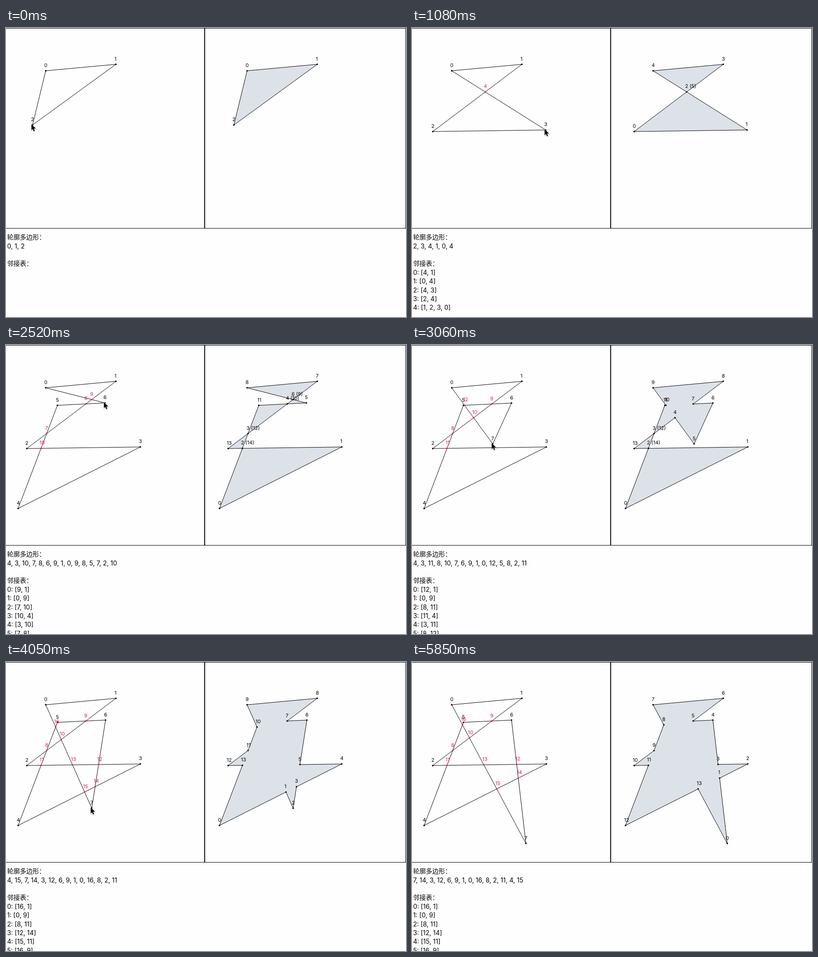
Write an HTML page that moves like this. It is 879 px wide and 637 px high and loops after 6.92 s.

```html
<!DOCTYPE html>
<html lang="zh">
<head>
<meta charset="utf-8">
<title>轮廓多边形</title>
<style>
  html, body { margin: 0; width: 100%; height: 100%; overflow: hidden; background: #fefefe; }
  svg { display: block; width: 879px; height: 637px; }
  text { font-family: Inter, "Noto Sans CJK SC", "Noto Sans CJK", sans-serif; font-size: 11px; }
  .line { font-size: 14px; }
  .edge { stroke: #000; stroke-width: 1; fill: none; }
  .area { fill: #dde1e8; }
  .cross { fill: #f0144f; }
</style>
</head>
<body>
<svg viewBox="0 0 879 637">
  <g id="scene"></g>
  <path d="M0 .5H879M0 441.5H879M878.5 0V442" stroke="#000"/>
  <path d="M436.5 0V442" stroke="#000" stroke-width="2"/>
  <g id="cursor">
    <path d="M0 0V13.2L3 10.4 5.1 15.4 7.4 14.4 5.3 9.6H9.6Z" transform="translate(.4 1.4)"
      fill="#000" stroke="#000" stroke-width="2" opacity=".14"/>
    <path d="M0 0V13.2L3 10.4 5.1 15.4 7.4 14.4 5.3 9.6H9.6Z"
      fill="#000" stroke="#fff" stroke-width="1" paint-order="stroke"/>
  </g>
</svg>
<script>
const LOOP = 6920, STEP = 90, SHIFT = 442.5;

// One track per corner: [time, x, y]; a corner exists from its first key on.
const tracks = [
  [[0, 87.3, 94.3]],
  [[0, 241.5, 80]],
  [[0, 58.3, 213.8], [450, 45.7, 228.2]],
  [[630, 56, 228], [1080, 293.8, 224.8], [1170, 294.8, 224.8], [1260, 295.3, 224.8]],
  [[1350, 285, 232], [1620, 26.7, 360.2]],
  [[1710, 27.5, 356], [2250, 113, 133]],
  [[2340, 120, 132], [2520, 217.5, 127.7], [2610, 218.7, 128]],
  [[2790, 216, 133], [3060, 177.5, 218], [4050, 188.5, 322.3],
   [5670, 188.5, 322.3], [5760, 228, 373], [5850, 250.3, 400]]
];

const scene = document.getElementById('scene');
const cursor = document.getElementById('cursor');

function place(track, t) {
  const next = track.findIndex(key => key[0] > t);
  if (next < 0) return track[track.length - 1].slice(1);
  const [t0, x0, y0] = track[next - 1], [t1, x1, y1] = track[next];
  const p = (t - t0) / (t1 - t0);
  const k = t1 - t0 > 600 ? p : (1 - Math.cos(Math.PI * p)) / 2;
  return [x0 + (x1 - x0) * k, y0 + (y1 - y0) * k];
}

function crossing([ax, ay], [bx, by], [cx, cy], [dx, dy]) {
  const rx = bx - ax, ry = by - ay, sx = dx - cx, sy = dy - cy;
  const det = rx * sy - ry * sx;
  if (!det) return null;
  const u = ((cx - ax) * sy - (cy - ay) * sx) / det;
  const v = ((cx - ax) * ry - (cy - ay) * rx) / det;
  return u > 0 && u < 1 && v > 0 && v < 1 ? { u, v, at: [ax + rx * u, ay + ry * u] } : null;
}

// Splits the edges at their crossings and links neighbouring nodes.
function buildGraph(corners) {
  const n = corners.length, nodes = corners.slice();
  const stops = corners.map((_, i) => [[0, i], [1, (i + 1) % n]]);
  for (let i = 0; i < n; i++) {
    for (let j = i + 2; j < n; j++) {
      if (i === 0 && j === n - 1) continue;
      const hit = crossing(corners[i], corners[i + 1], corners[j], corners[(j + 1) % n]);
      if (!hit) continue;
      stops[i].push([hit.u, nodes.length]);
      stops[j].push([hit.v, nodes.length]);
      nodes.push(hit.at);
    }
  }
  const links = nodes.map(() => []);
  stops.forEach(list => {
    const ids = list.sort((a, b) => a[0] - b[0]).map(s => s[1]);
    ids.forEach((id, k) => {
      if (k > 0) links[id].push(ids[k - 1]);
      if (k < ids.length - 1) links[id].push(ids[k + 1]);
    });
  });
  // The closing edge comes last, so the first corner gets its neighbours swapped.
  links[0].reverse();
  return { nodes, links };
}

// Walks the outer border from the lowest node, always taking the outermost turn.
function trace({ nodes, links }) {
  const start = nodes.reduce((best, p, i) => p[1] > nodes[best][1] ? i : best, 0);
  const angle = (a, b) => Math.atan2(nodes[a][1] - nodes[b][1], nodes[b][0] - nodes[a][0]);
  const path = [];
  let here = start, from = -1;
  do {
    path.push(here);
    const back = from < 0 ? -Math.PI / 2 : angle(here, from);
    const turn = id => {
      const d = angle(here, id) - back;
      return ((d % (2 * Math.PI)) + 2 * Math.PI) % (2 * Math.PI);
    };
    const options = links[here].filter(id => id !== from).sort((a, b) => turn(a) - turn(b));
    from = here;
    here = options[0];
  } while (here !== start && path.length < 60);
  return path;
}

const num = v => v.toFixed(2);
const shape = (points, cls) =>
  `<polygon class="${cls}" points="${points.map(p => p.map(num).join()).join(' ')}"/>`;
const mark = ([x, y], label, cls = '') =>
  `<g class="${cls}"><circle cx="${num(x)}" cy="${num(y)}" r="1.7"/>` +
  `<text x="${num(x - 3.3)}" y="${num(y - 8.5)}">${label}</text></g>`;
const textLine = (s, i) => `<text class="line" x="2.4" y="${num(466.1 + 19.4 * i)}">${s}</text>`;

function draw(t) {
  const corners = tracks.filter(track => track[0][0] <= t).map(track => place(track, t));
  const graph = buildGraph(corners), { nodes, links } = graph;
  const crossed = nodes.length > corners.length;
  const outline = crossed ? trace(graph) : corners.map((_, i) => i);

  const left = shape(corners, 'edge') +
    nodes.map((p, i) => mark(p, i, i < corners.length ? '' : 'cross')).join('');

  const names = new Map();
  outline.forEach((id, i) => names.set(id, names.has(id) ? `${names.get(id)} (${i})` : `${i}`));
  const right = shape(outline.map(id => nodes[id]), 'edge area') +
    [...names].map(([id, label]) => mark(nodes[id], label)).join('');

  const lines = ['轮廓多边形：', outline.join(', '), '', '邻接表：'];
  if (crossed) links.forEach((list, i) => lines.push(`${i}: [${list.join(', ')}]`));

  scene.innerHTML = left + `<g transform="translate(${SHIFT} 0)">${right}</g>` +
    lines.slice(0, 10).map(textLine).join('');

  const [x, y] = corners[corners.length - 1];
  cursor.setAttribute('transform', `translate(${num(x - 2.4)} ${num(y - 1.8)})`);
  cursor.setAttribute('visibility', t < 5850 ? 'visible' : 'hidden');
}

const begin = performance.now();
let shown = -1;
function tick() {
  const t = Math.floor(((performance.now() - begin) % LOOP) / STEP) * STEP;
  if (t !== shown) draw(shown = t);
  requestAnimationFrame(tick);
}
tick();
</script>
</body>
</html>
```
